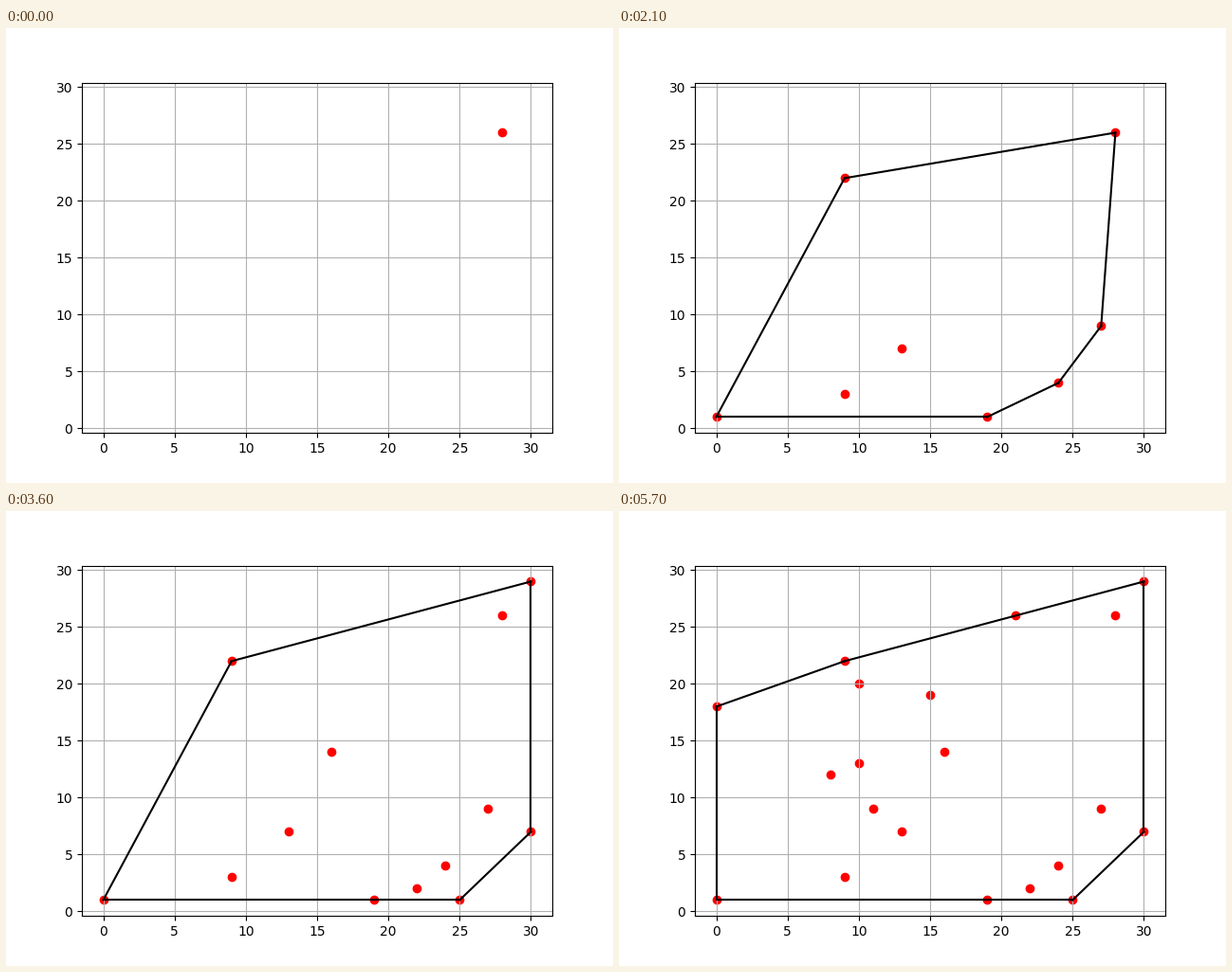
Recreate the animation shown at these times as a matplotlib script. Size 640 by 480 pixels, loop 6000 ms.

```python
import matplotlib.pyplot as plt
from matplotlib.animation import FuncAnimation

# The points in order of arrival; everything else follows from them.
POINTS = [
    (28, 26), (9, 22), (13, 7), (27, 9), (19, 1),
    (0, 1), (24, 4), (9, 3), (30, 7), (16, 14),
    (30, 29), (22, 2), (25, 1), (8, 12), (11, 9),
    (21, 26), (10, 20), (0, 18), (10, 13), (15, 19),
]
STEP_MS = 300


def cross(o, a, b):
    return (a[0] - o[0]) * (b[1] - o[1]) - (a[1] - o[1]) * (b[0] - o[0])


def half_hull(pts):
    """Lower chain of points that are sorted by x."""
    chain = []
    for p in pts:
        while len(chain) > 1 and cross(chain[-2], chain[-1], p) <= 0:
            chain.pop()
        chain.append(p)
    return chain


def hull_edges(pts):
    """Edges of the convex hull, counter-clockwise."""
    pts = sorted(pts)
    if len(pts) <= 2:
        return list(zip(pts, pts[1:]))
    ring = half_hull(pts)[:-1] + half_hull(pts[::-1])[:-1]
    return list(zip(ring, ring[1:] + ring[:1]))


fig, ax = plt.subplots(figsize=(6.4, 4.8), dpi=100)
ax.grid(True)

# Scattering all points first fixes the view for the whole loop.
dots = ax.scatter(*zip(*POINTS), color="red")
ax.autoscale_view()
ax.autoscale(False)

# Each edge is its own line, so the ends keep their square caps.
edges = [ax.plot([], [], "k-", lw=1.5)[0] for _ in POINTS]


def update(i):
    shown = POINTS[:i + 1]
    dots.set_offsets(shown)
    for line in edges:
        line.set_data([], [])
    for line, edge in zip(edges, hull_edges(shown)):
        line.set_data(*zip(*edge))
    return [dots, *edges]


anim = FuncAnimation(fig, update, frames=len(POINTS), interval=STEP_MS,
                     init_func=lambda: update(0), repeat=True, repeat_delay=0)
plt.show()
```
